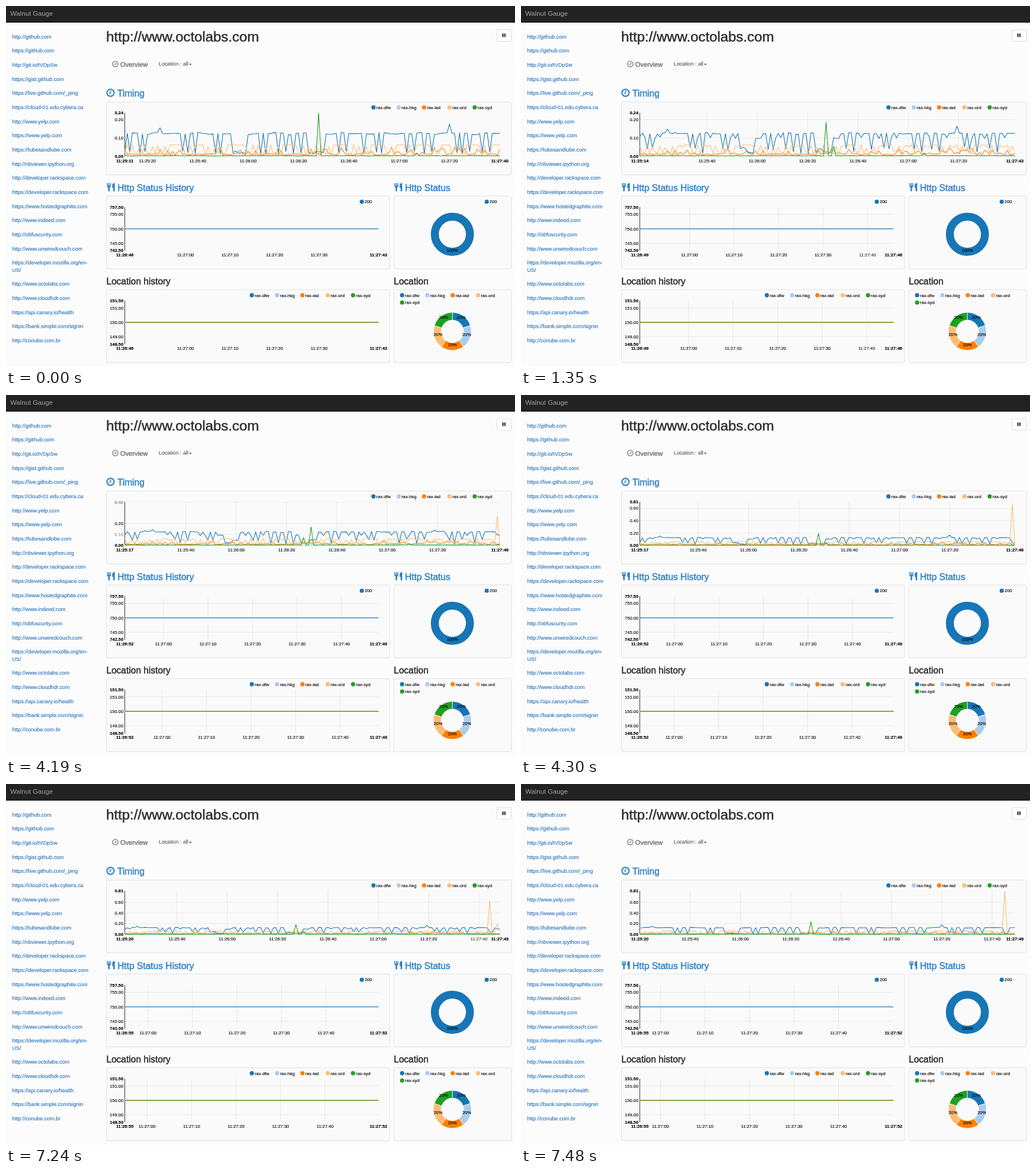
An HTML page for the animation above (8.6 s loop, 889 by 630 pixels).

```html
<!DOCTYPE html>
<html lang="en">
<head>
<meta charset="utf-8">
<title>Uptime dashboard</title>
<style>
html, body { margin: 0; width: 100%; height: 100%; overflow: hidden; background: #fcfcfc; }
svg { display: block; width: 889px; height: 630px; font: 7.75px "Liberation Sans", Arial, Helvetica, sans-serif; }
text { fill: currentColor; stroke: currentColor; stroke-width: .12px; }
.card { fill: #fafafa; stroke: #e2e2e2; }
.link { font-size: 9.28px; color: #2470ba; }
.medium { stroke-width: .5px; }
.bold { font-weight: bold; }
.mid { text-anchor: middle; }
.end { text-anchor: end; }
.grid { stroke: #e8e8e8; }
.line { fill: none; stroke-width: 1.1; stroke-linejoin: round; }
</style>
</head>
<body>
<svg viewBox="0 0 889 630"><g id="page"></g><g id="live"></g></svg>
<script>
const LOOP = 8600;
const LEFT = 207.5;
const BLUE = '#3283c8';
const COLORS = ['#1776b6', '#aaccee', '#ff7f00', '#ffbc71', '#20a020'];
const REGIONS = ['rax-dfw', 'rax-hkg', 'rax-iad', 'rax-ord', 'rax-syd'];
const LINKS = ['http://github.com', 'https://github.com', 'http://git.io/tVDpSw', 'https://gist.github.com',
  'https://live.github.com/_ping', 'https://cloud-01.edu.cybera.ca', 'http://www.yelp.com', 'https://www.yelp.com',
  'https://tubesandlube.com', 'http://nbviewer.ipython.org', 'http://developer.rackspace.com',
  'https://developer.rackspace.com', 'https://www.hostedgraphite.com', 'http://www.indeed.com',
  'http://obfuscurity.com', 'http://www.unwiredcouch.com', 'https://developer.mozilla.org/en-|US/',
  'http://www.octolabs.com', 'http://www.cloudhdr.com', 'https://api.canary.io/health',
  'https://bank.simple.com/signin', 'http://conube.com.br'];

// [start in ms, number of data updates, progress of the latest update]
const STEPS = [[0, 0, 1], [1170, 1, .26], [1350, 1, .62], [1460, 1, 1], [4190, 2, .528], [4300, 2, .75],
  [4420, 2, 1], [7240, 3, .613], [7360, 3, .85], [7480, 3, 1]];

const lerp = (a, b, t) => a + (b - a) * t;
const ease = t => t >= 1 ? 1 : t < .5 ? 4 * t ** 3 : 1 - 4 * (1 - t) ** 3;
const clock = s => [s / 3600, s / 60 % 60, s % 60].map(n => String(Math.floor(n)).padStart(2, '0')).join(':');
const at = (h, m, s) => h * 3600 + m * 60 + s;

const text = (x, y, str, cls = '', attrs = '') => `<text x="${x}" y="${y}" class="${cls}" ${attrs}>${str}</text>`;
const line = (x1, y1, x2, y2, attrs) => `<line x1="${x1}" y1="${y1}" x2="${x2}" y2="${y2}" ${attrs}/>`;
const rect = (x, y, w, h, attrs) => `<rect x="${x}" y="${y}" width="${w}" height="${h}" ${attrs}/>`;
const heading = (x, y, str, size, color) => text(x, y, str, 'medium', `font-size="${size}" color="${color}"`);
const legend = (x, y, label, color) =>
  `<circle cx="${x}" cy="${y}" r="3.7" fill="${color}"/>` + text(x + 5, y + 2.7, label);

// One sample per second and region
function random(seed) {
  return () => (seed = seed * 16807 % 2147483647) / 2147483647;
}
const rnd = random(4242);
const slow = new Set([0, 2, 6, 8, 23, 25, 28, 36, 38, 43, 44, 45, 46, 47, 48, 54, 56, 61, 64, 67, 70, 73, 74, 75,
  76, 77, 78, 79, 85, 88, 95, 100, 102, 112, 115, 119, 122, 132, 134, 137, 142, 145, 154, 155]);
const plateaus = [[18, 22], [28, 31], [41, 47], [63, 68], [84, 88], [98, 103], [108, 110], [117, 121],
  [126, 129], [136, 140], [146, 149]];
const SERIES = REGIONS.map(() => []);
for (let i = 0; i < 159; i++) {
  const flat = plateaus.some(([a, b]) => i >= a && i <= b);
  const high = .125 + .006 * Math.sin(i * .6) * Math.sin(i * .17) + .003 * (rnd() - .5);
  SERIES[0].push(i === 14 ? .155 : i === 129 ? .176 : slow.has(i) ? .012 + .018 * rnd() : high);
  SERIES[1].push(.003);
  SERIES[2].push(rnd() < .28 ? .02 + .028 * rnd() : .006 + .01 * rnd());
  SERIES[3].push(i === 154 ? .81 : flat ? .062 : i % 5 % 2 ? .05 + .014 * rnd() : .006 + .014 * rnd());
  SERIES[4].push(i === 77 ? .237 : i === 116 ? .018 : .002 + .003 * rnd());
}

const BASE = 262.4, PLOT = 75.8;
const peak = k => k < 2 ? .237 : .81;
const yTicks = k => k < 2 ? [.1, .2] : [.2, .4, .6];
const yAt = (v, k) => BASE - v / peak(k) * PLOT;

function timeAxis(chart, k, e, showGrid) {
  const { right, top, bottom, start, end, step, zero, first } = chart;
  const perSec = (right - LEFT) / (end - start);
  const pos = (s, n) => zero + (s - first - 3 * n) * perSec;
  const fits = x => x > LEFT + 32 && x < right - 32;
  let out = '';
  for (let s = first - 2 * step; s < end + 12; s += step) {
    if (!fits(pos(s, k))) continue;
    const old = Math.max(0, k - 1);
    const x = lerp(pos(s, old), pos(s, k), e).toFixed(2);
    const opacity = fits(pos(s, old)) ? 1 : e;
    out += `<g opacity="${opacity}">` + (showGrid ? line(x, top, x, bottom, 'class="grid"') : '') +
      text(x, bottom + 10.2, clock(s), 'mid') + '</g>';
  }
  return out + text(LEFT, bottom + 10.2, clock(start + 3 * k), 'mid bold') +
    text(right, bottom + 10.2, clock(end + 3 * k), 'mid bold');
}

function valueAxis(k, e, showGrid) {
  const old = Math.max(0, k - 1);
  const before = yTicks(old), after = yTicks(k);
  let out = '';
  for (const v of new Set([...before, ...after])) {
    const y = lerp(yAt(v, old), yAt(v, k), e);
    if (y < 184) continue;
    const opacity = !before.includes(v) ? e : !after.includes(v) ? 1 - e : 1;
    out += `<g opacity="${opacity}">` + (showGrid ? line(LEFT, y, 862.5, y, 'class="grid"') : '') +
      text(205, y + 2.7, v.toFixed(2), 'end') + '</g>';
  }
  const rescaling = peak(old) !== peak(k) && e < .9;
  if (!rescaling) out += text(205, 189.2, peak(k).toFixed(2), 'end bold');
  return out + text(205, BASE + 2.7, '0.00', 'end bold');
}

function seriesLines(k, e) {
  const old = Math.max(0, k - 1), dx = (862.5 - LEFT) / 149;
  return SERIES.map((values, n) => {
    const points = Array.from({ length: 150 }, (_, i) => {
      const y = lerp(yAt(values[i + 3 * old], old), yAt(values[i + 3 * k], k), e);
      return (LEFT + dx * i).toFixed(1) + ',' + y.toFixed(2);
    });
    return `<polyline class="line" stroke="${COLORS[n]}" points="${points.join(' ')}"/>`;
  }).join('');
}

const TIMING = { right: 862.5, top: 186.5, bottom: 262.4, start: at(11, 25, 11), end: at(11, 27, 40),
  step: 20, zero: 335, first: at(11, 25, 40) };
const history = (top, colors, labels, lag) => ({ right: 650.5, top, bottom: top + 76, start: at(11, 26, 46),
  end: at(11, 27, 43), step: 10, zero: 313.6, first: at(11, 27, 0), colors, labels, lag });
const HISTORIES = [
  history(351.1, COLORS.slice(0, 1), ['757.50', '755.00', '750.00', '745.00', '742.50'], .028),
  history(514.2, COLORS, ['151.50', '151.00', '150.00', '149.00', '148.50'], .08)
];

function historyChart(chart, k, progress, showGrid) {
  const { right, top, bottom, colors, labels, lag } = chart;
  const ys = [0, 12.6, 37.8, 63, 75.6].map(d => top + d);
  let out = showGrid ? line(LEFT, ys[1], right, ys[1], 'class="grid"') + line(LEFT, ys[3], right, ys[3], 'class="grid"') : '';
  out += timeAxis(chart, k, ease(progress + lag), showGrid);
  labels.forEach((s, i) => out += text(205, ys[i] + 2.7, s, i % 4 ? 'end' : 'end bold'));
  out += line(LEFT, top, LEFT, bottom, 'stroke="#333"');
  return out + colors.map(c => line(LEFT, ys[2], right, ys[2], `class="line" stroke="${c}"`)).join('');
}

function render([, k, progress], showGrid) {
  const e = ease(progress);
  return valueAxis(k, e, showGrid) + timeAxis(TIMING, k, e, showGrid) +
    line(LEFT, 186.5, LEFT, BASE, 'stroke="#333"') + seriesLines(k, e) +
    HISTORIES.map(c => historyChart(c, k, progress, showGrid)).join('');
}

function cutlery(x) {
  return `<g transform="translate(${x} 309)" fill="${BLUE}">` +
    [0, 2.7, 5.4].map(d => rect(d, 0, 1.5, 5, '')).join('') +
    '<path d="M0 4.5h6.9q0 2.6-2 3.2v5.8q0 1-1.4 1t-1.4-1V7.7q-2.1-.6-2.1-3.2z"/>' +
    '<path d="M13.7 0v13.5q0 1-1.4 1t-1.4-1V8.5H9.2V3.5Q9.6 0 13.7 0z"/></g>';
}

function donut(cx, cy, outer, inner, parts) {
  const polar = (a, r) => [cx + r * Math.sin(a), cy - r * Math.cos(a)].map(n => n.toFixed(2));
  const turn = 2 * Math.PI / parts;
  const mean = (outer + inner) / 2;
  let out = '';
  for (let i = 0; i < parts; i++) {
    const a = i * turn, b = a + turn;
    out += parts === 1
      ? `<circle cx="${cx}" cy="${cy}" r="${mean}" fill="none" stroke="${COLORS[0]}" stroke-width="${outer - inner}"/>`
      : `<path d="M${polar(a, outer)}A${outer} ${outer} 0 0 1 ${polar(b, outer)}L${polar(b, inner)}A${inner} ${inner} 0 0 0 ${polar(a, inner)}z" fill="${COLORS[i]}" stroke="#fff" stroke-width=".8"/>`;
  }
  for (let i = 0; i < parts; i++) out += text(...polar((i + .5) * turn, mean), 100 / parts + '%', 'mid');
  return out;
}

function page() {
  let out = rect(0, 0, 889, 28, 'fill="#222"') + rect(0, 28, 889, 1, 'fill="#0c0c0c"') +
    text(7.5, 16.8, 'Walnut Gauge', '', 'font-size="11.7" color="#999"');

  let y = 56.7;
  for (const link of LINKS) {
    link.split('|').forEach((part, i) => {
      if (i) y += 12.3;
      out += text(10.8, y.toFixed(1), part, 'link');
    });
    y += 24.66;
  }

  out += heading(175, 62.3, 'http://www.octolabs.com', 24.75, '#2e2e2e') +
    rect(857.5, 41.5, 25, 20, 'rx="2" fill="#fff" stroke="#ddd"') +
    rect(866.8, 48, 2.3, 6.2, 'fill="#333"') + rect(870.2, 48, 2.3, 6.2, 'fill="#333"') +
    '<g fill="none" stroke="#777" stroke-width="1.3"><circle cx="190.8" cy="101.3" r="4.9"/><path d="M190 103l2.8-3.7M187.8 101.5h.8M189.3 98.6l.4.5"/></g>' +
    heading(199.6, 106.3, 'Overview', 11.5, '#777') +
    text(266.8, 104.4, 'Location : all', '', 'font-size="9.2" color="#555"') +
    '<path d="M319.5 100.8h5l-2.5 2.6z" fill="#555"/>';

  out += `<g fill="none" stroke="${BLUE}"><circle cx="182.5" cy="151.5" r="6.2" stroke-width="2.2"/><path d="M182.8 147.5v4.5h-3.2" stroke-width="1.4"/></g>` +
    heading(194.5, 158.2, 'Timing', 16, BLUE) +
    cutlery(176.3) + heading(194.8, 322.7, 'Http Status History', 16, BLUE) +
    cutlery(678.3) + heading(696.8, 322.7, 'Http Status', 16, BLUE) +
    heading(175.3, 486, 'Location history', 16, '#2e2e2e') +
    heading(677.3, 486, 'Location', 16, '#2e2e2e');

  for (const [x, top, w] of [[175.5, 167.5, 707], [175.5, 331.5, 494.5], [677.5, 331.5, 205], [175.5, 495, 494.5], [677.5, 495, 205]])
    out += rect(x, top, w, 127.3, 'rx="2.5" class="card"');

  REGIONS.forEach((name, i) => {
    out += legend(641.8 + 44.2 * i, 177, name, COLORS[i]) +
      legend(429.3 + 44.2 * i, 504.8, name, COLORS[i]) +
      legend(691.8 + 44.2 * (i % 4), i < 4 ? 504.8 : 517.4, name, COLORS[i]);
  });
  out += legend(621.4, 341.6, '200', COLORS[0]) + legend(839.6, 341.6, '200', COLORS[0]);
  return out + donut(779.6, 398.3, 37.6, 23.7, 1) + donut(779.6, 567.8, 33, 19.7, 5);
}

const live = document.getElementById('live');
document.getElementById('page').innerHTML = page();
const origin = performance.now();
let shown = -1;

function tick() {
  const t = (performance.now() - origin) % LOOP;
  const index = STEPS.filter(step => step[0] <= t).length - 1;
  if (index !== shown) {
    shown = index;
    live.innerHTML = render(STEPS[index], index > 0);
  }
  requestAnimationFrame(tick);
}
tick();
</script>
</body>
</html>
```
